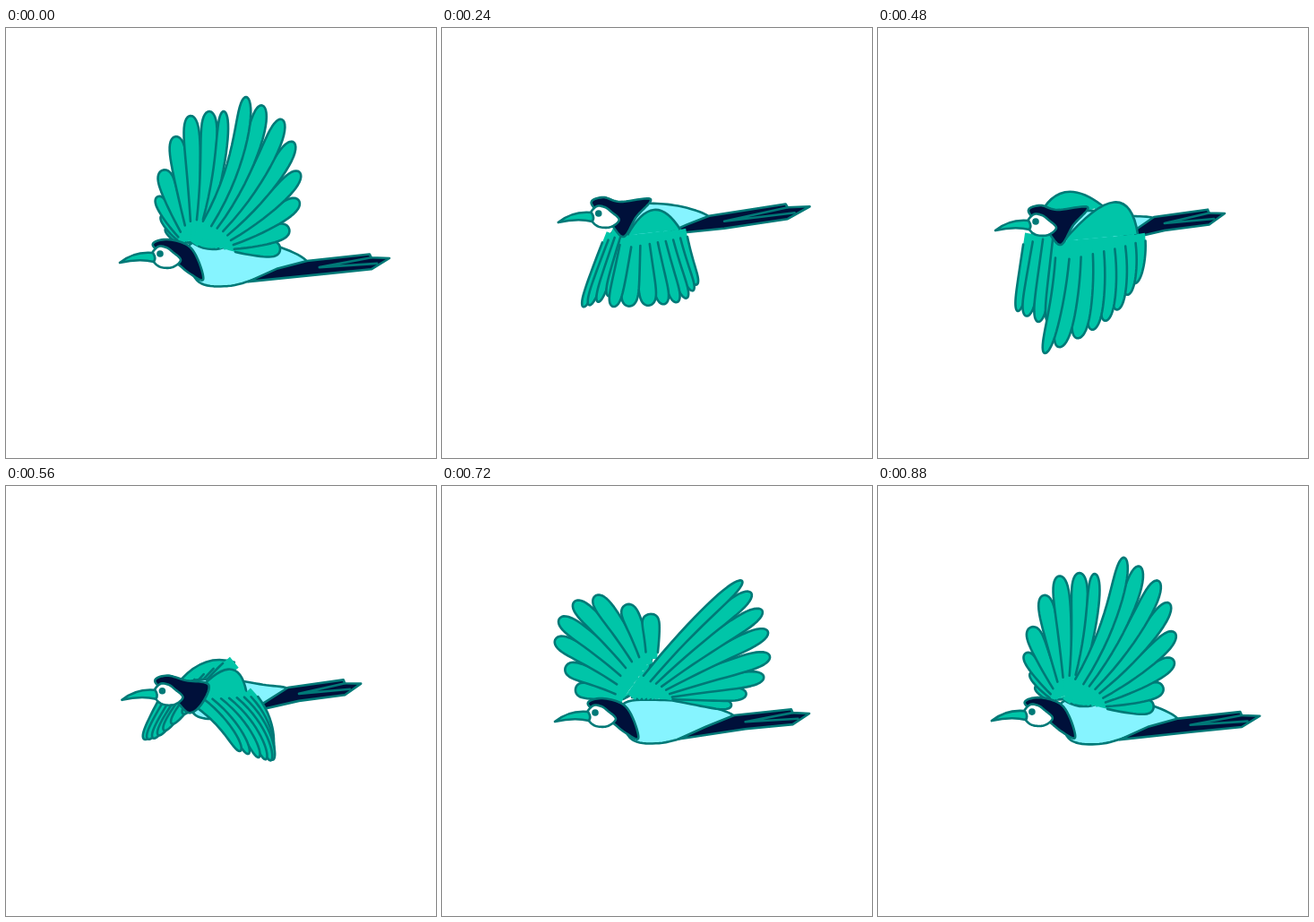
These frames come from a looping animation (480 px wide and 480 px high, 0.96 s). An HTML page with a canvas:

```html
<!DOCTYPE html>
<html lang="en">
<head>
<meta charset="utf-8">
<title>Flying bird</title>
<style>
html, body { margin: 0; width: 100%; height: 100%; overflow: hidden; background: #fff; }
canvas { display: block; }
</style>
</head>
<body>
<canvas id="stage" width="480" height="480"></canvas>
<script>
const ctx = document.getElementById('stage').getContext('2d');
const LINE = '#007977', TEAL = '#00c5a8', SKY = '#86f4ff', NAVY = '#00103a';
const STEP = 80, FEATHERS = 8;

// A wing is a fan of feathers from a root line to a rim curve through four points.
// The bend goes from the first feather to the last; the shoulder closes the root.
const wing = (root, shoulder, bend, ...rim) => ({ root, shoulder, bend, rim });

// head is the eye, joint and tip are the ends of the tail, fold closes the neck over the back
const poses = [
  { head: [172, 252], joint: [336, 263], tip: [428, 257], fold: 0,
    near: wing([210, 241, 248, 243], [228, 252], [.14, .06], [268, 77], [313, 109], [328, 182], [306, 246]),
    far: wing([217, 236, 195, 238], [206, 242], [.08, -.14], [243, 93], [200, 103], [170, 180], [180, 222]) },
  { head: [174, 225], joint: [314, 230], tip: [412, 221], fold: 1,
    near: wing([216, 232, 203, 258], [190, 255], [.04, .3], [257, 122], [298, 157], [312, 212], [288, 258]),
    far: wing([224, 222, 192, 245], [215, 245], [.05, -.05], [236, 133], [195, 148], [162, 205], [178, 264]) },
  { head: [175, 201], joint: [293, 207], tip: [410, 192], fold: 1,
    near: wing([204, 231, 287, 214], [252, 152], [-.03, -.04], [169, 374], [217, 360], [256, 334], [283, 296]),
    far: wing([240, 205, 188, 224], [205, 195], [0, .03], [250, 310], [215, 330], [183, 337], [151, 327]) },
  { head: [176, 216], joint: [308, 214], tip: [387, 207], fold: 1,
    near: wing([207, 238, 290, 230], [278, 155], [-.06, -.12], [186, 363], [228, 343], [262, 319], [286, 285]),
    far: wing([250, 198, 172, 230], [195, 156], [0, 0], [240, 300], [212, 325], [183, 329], [156, 316]) },
  { head: [172, 248], joint: [325, 249], tip: [410, 241], fold: 0,
    near: wing([208, 233, 236, 230], [228, 208], [-.25, -.4], [375, 195], [371, 245], [351, 287], [306, 321]),
    far: wing([262, 195, 198, 237], [245, 225], [.15, .06], [158, 164], [136, 183], [141, 208], [152, 233]) },
  { head: [171, 253], joint: [326, 259], tip: [410, 254], fold: 0,
    near: wing([212, 236, 248, 233], [230, 240], [-.05, 0], [335, 106], [360, 146], [363, 206], [323, 245]),
    far: wing([234, 193, 202, 238], [230, 225], [.04, .06], [232, 143], [162, 123], [126, 163], [149, 227]) }
];
// Position in the pose cycle for each held step
const cycle = [0, .5, 1, 1.75, 2, 2.5, 3, 3.4, 4, 5, 5.5, 5.9];

// Blends numbers, points and whole poses alike
function mix(a, b, t) {
  if (typeof a === 'number') return a + (b - a) * t;
  if (Array.isArray(a)) return a.map((v, i) => mix(v, b[i], t));
  return Object.fromEntries(Object.keys(a).map(key => [key, mix(a[key], b[key], t)]));
}

function paint(path, fill, stroke = LINE) {
  if (fill) { ctx.fillStyle = fill; ctx.fill(path); }
  if (stroke) { ctx.strokeStyle = stroke; ctx.stroke(path); }
}

function polygon(points) {
  const path = new Path2D();
  points.forEach(p => path.lineTo(...p));
  path.closePath();
  return path;
}

function spline(p0, p1, p2, p3, t) {
  return p1.map((v, k) => v + t / 2 * (p2[k] - p0[k] + t * (2 * p0[k] - 5 * v + 4 * p2[k] - p3[k]
    + t * (3 * (v - p2[k]) + p3[k] - p0[k]))));
}

// Closed curve through all points
function smooth(points) {
  const n = points.length, at = i => points[(i + n) % n], outline = [];
  for (let i = 0; i < n; i++)
    for (let t = 0; t < 1; t += .1) outline.push(spline(at(i - 1), at(i), at(i + 1), at(i + 2), t));
  return polygon(outline);
}

function rimPoint(rim, u) {
  const i = Math.max(0, Math.min(2, Math.floor(u * 3)));
  return spline(rim[Math.max(0, i - 1)], rim[i], rim[i + 1], rim[Math.min(3, i + 2)], u * 3 - i);
}

// Blade along a bent centre line, open at the root, round at the tip
function feather(base, tip, bend, rootHalf, tipHalf, start) {
  const [dx, dy] = [tip[0] - base[0], tip[1] - base[1]];
  const middle = [(base[0] + tip[0]) / 2 - dy * bend, (base[1] + tip[1]) / 2 + dx * bend];
  const path = new Path2D(), n = 18;
  for (let i = -n; i <= n; i++) {
    const t = mix(start, 1, 1 - (i / n) ** 2);
    const a = mix(base, middle, t), b = mix(middle, tip, t), [x, y] = mix(a, b, t);
    const half = mix(rootHalf, tipHalf, t) * Math.sqrt(1 - t ** 10) * Math.sign(i)
      / Math.hypot(b[0] - a[0], b[1] - a[1]);
    path.lineTo(x - (b[1] - a[1]) * half, y + (b[0] - a[0]) * half);
  }
  return path;
}

function drawWing({ root, shoulder, bend, rim }) {
  const first = root.slice(0, 2), last = root.slice(2), gap = 1 / (FEATHERS - 1);
  const cap = new Path2D();
  cap.moveTo(...first);
  cap.quadraticCurveTo(...shoulder, ...last);
  paint(cap, TEAL);
  const rootHalf = 2 + .5 * gap * Math.hypot(last[0] - first[0], last[1] - first[1]);
  for (let i = FEATHERS - 1; i >= 0; i--) {
    const u = i * gap, base = mix(first, last, u), tip = rimPoint(rim, u);
    // Feathers are as wide as the distance to their neighbours, seen across the blade
    const a = rimPoint(rim, Math.max(0, u - gap / 2)), b = rimPoint(rim, Math.min(1, u + gap / 2));
    const dx = tip[0] - base[0], dy = tip[1] - base[1];
    const across = Math.abs((b[0] - a[0]) * dy - (b[1] - a[1]) * dx) / Math.hypot(dx, dy);
    const edge = i % (FEATHERS - 1) ? 1 : 2;
    const tipHalf = Math.max(5, Math.min(11, .56 * edge * across));
    const blade = start => feather(base, tip, mix(...bend, u), rootHalf, tipHalf, start);
    paint(blade(0), TEAL, null);
    paint(blade(.15), null);
  }
}

// Body and tail stretch between the head and the tail joint
function drawBody({ head: [x, y], joint, tip }) {
  const length = joint[0] - x, at = (u, v) => [x + u * length, y + v * length];
  paint(smooth([at(.2, -.06), at(.5, -.09), at(.8, -.05), joint, at(.72, .15), at(.46, .22), at(.25, .18)]), SKY);

  const along = (t, rise) => mix([joint[0], joint[1] + rise], [tip[0], tip[1] + rise], t);
  const upper = along(.76, -6), lower = along(.78, 11), inner = along(.15, 5);
  paint(polygon([at(.6, .19), at(.8, .1), along(0, -3), upper, along(.78, -2), tip, lower, along(.15, 13)]), NAVY);
  const streaks = new Path2D();
  for (const end of [along(.78, -2), along(.85, 5)]) {
    streaks.moveTo(...inner);
    streaks.lineTo(...end);
  }
  paint(streaks);
}

function drawHead({ head: [x, y], fold }) {
  const place = points => smooth(points.map(p => [x + p[0], y + p[1]]));
  const open = [[-8, -9], [6, -16], [30, -10], [42, 6], [48, 29], [33, 22], [18, 10]];
  const folded = [[-8, -11], [5, -18], [24, -13], [58, -16], [42, 4], [28, 26], [13, 11]];
  paint(place(mix(open, folded, fold)), NAVY);
  paint(place([[-9, 0], [-2, -8], [7, -7], [14, -2], [23, 7], [14, 15], [1, 15], [-7, 9]]), '#fff');

  const beak = new Path2D();
  beak.moveTo(x - 45, y + 10);
  beak.quadraticCurveTo(x - 29, y - 3, x - 8, y - 1);
  beak.quadraticCurveTo(x - 4, y + 5, x - 7, y + 9);
  beak.quadraticCurveTo(x - 23, y + 5, x - 45, y + 10);
  paint(beak, TEAL);
  const eye = new Path2D();
  eye.arc(x, y, 3.8, 0, 7);
  paint(eye, LINE, null);
}

function draw(now) {
  const position = cycle[Math.floor(now / STEP) % cycle.length], i = Math.floor(position);
  const pose = mix(poses[i], poses[(i + 1) % poses.length], position - i);
  ctx.fillStyle = '#fff';
  ctx.fillRect(0, 0, 480, 480);
  ctx.lineWidth = 2.6;
  ctx.lineJoin = ctx.lineCap = 'round';
  drawWing(pose.far);
  drawBody(pose);
  drawWing(pose.near);
  drawHead(pose);
}

const started = performance.now();
function tick() {
  draw(performance.now() - started);
  requestAnimationFrame(tick);
}
tick();
</script>
</body>
</html>
```
